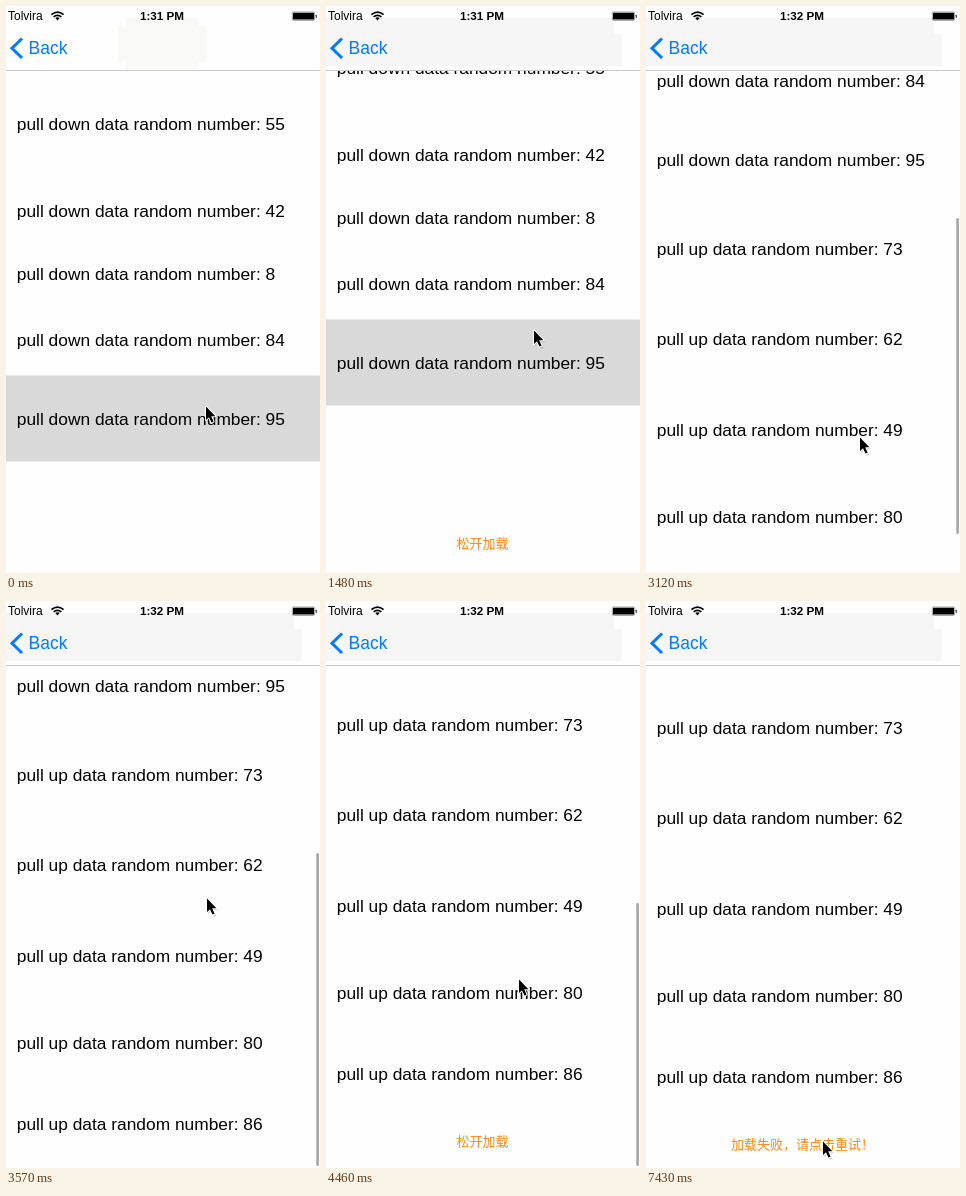
An HTML page for the animation above (8 s loop, 314 by 567 pixels).

```html
<!DOCTYPE html>
<html lang="en">
<head>
<meta charset="utf-8">
<title>Pull to load</title>
<style>
  html, body { margin: 0; width: 100%; height: 100%; overflow: hidden; background: #fefefe; }
  svg { display: block; width: 100%; height: 100%; }
  text { font-family: "Liberation Sans", Arial, sans-serif; white-space: pre; }
  .row { font-size: 17.35px; }
  #clock { font-size: 11.7px; font-weight: bold; text-anchor: middle; }
  #hint {
    font: 13px "Noto Sans CJK SC", "Noto Sans CJK", sans-serif;
    fill: #ff8a14; text-anchor: middle;
  }
</style>
</head>
<body>
<svg viewBox="0 0 314 567">
  <rect width="314" height="567" fill="#fefefe"/>
  <g id="list">
    <rect id="picked" y="369.5" width="314" height="86" fill="#d9d9d9"/>
    <g id="down"></g>
    <g id="up"></g>
    <text id="hint" x="156.5"></text>
  </g>
  <rect id="bar" x="310.3" width="2.6" rx="1.3" fill="#a6a6a6"/>

  <rect width="314" height="64" fill="#fefefe"/>
  <path id="tint"/>
  <rect y="64" width="314" height="1" fill="#c9c9c9"/>
  <text x="2" y="14.3" font-size="12">Tolvira</text>
  <g fill="none" stroke="#000" stroke-width="1.7">
    <path d="M45.4 8.6Q51.5 3.6 57.6 8.6M47.6 10.9Q51.5 7.7 55.4 10.9"/>
    <path d="M49.4 12L51.5 14.4L53.6 12Q51.5 10.6 49.4 12Z" fill="#000" stroke="none"/>
  </g>
  <text id="clock" x="156" y="14"></text>
  <rect x="286.3" y="6" width="22.4" height="8.4" rx="1.4" fill="none" stroke="#666" stroke-width=".6"/>
  <rect x="287" y="6.8" width="21" height="6.8" rx=".6"/>
  <rect x="309.6" y="8.7" width="1.3" height="3.2" rx=".6" fill="#444"/>
  <path d="M16 32.5L6 42.3L16 52" fill="none" stroke="#007aff" stroke-width="3"/>
  <text x="22.6" y="48" font-size="17.5" fill="#007aff">Back</text>

  <g id="cursor" stroke-linejoin="round">
    <path d="M1 2V16L4.3 13L7 19L9.4 18L6.8 12.2H11.2Z" opacity=".18"/>
    <path d="M0 .5V14L3 11.2L5.5 16.6L7.6 15.7L5.2 10.2H9.4Z" stroke="#fff" stroke-width="2" paint-order="stroke"/>
  </g>
</svg>
<script>
const LOOP = 8000, STEP = 148.5, LEAD = 439;
const END = 325;        // scroll offset at the end of the full list
const LOADED = 13, FAILED = 34;
const $ = id => document.getElementById(id);

// Moves: [first tick, last tick, ...goal], each easing out from the goal before.
const drags = [
  [0, 0, 0],
  [0, 2, 103],    // pull past the end
  [4, 10, 50],    // let go, rest above the hint
  [16, 22, 328],  // flick through the new rows
  [22, 25, 399],  // pull again
  [26, 29, 375]
];
const pointer = [
  [0, 0, 200, 400],
  [0, 2, 196, 172], [4, 5, 194, 226], [5, 14, 220, 403],
  [16, 17, 217, 340], [17, 19, 214, 431], [19, 25, 197, 252],
  [26, 34, 188, 539], [39, 41, 196, 543], [46, 48, 177, 540]
];

const clamp = x => Math.min(1, Math.max(0, x));
const easeOut = p => 1 - (1 - p) ** 2;

function follow(moves, k) {
  return moves.slice(1).reduce((pos, [a, b, ...goal]) => {
    const e = easeOut(clamp((k - a) / (b - a)));
    return pos.map((v, i) => v + (goal[i] - v) * e);
  }, moves[0].slice(2)).map(Math.round);
}

function addRows(id, rows) {
  $(id).innerHTML = rows.map(([y, n]) =>
    `<text class="row" x="10.8" y="${y + 0.5}">pull ${id} data random number: ${n}</text>`).join("");
}
addRows("down", [[123, 55], [210, 42], [273, 8], [339, 84], [418, 95]]);
addRows("up", [[507, 73], [597, 62], [688, 49], [775, 80], [856, 86]]);

function setText(id, s) {
  if ($(id).textContent !== s) $(id).textContent = s;
}

function navTint(k) {
  if (k < 5) return "M120 12h72v8h8v36h-8v8h-72v-8h-8v-36h8z";
  if (k >= 12 && k < 17) return "M0 36h264v8h16v8h8v12H0z";
  return "M0 12h288v16h8v32H0z";
}

function draw(t) {
  const k = Math.max(0, Math.floor((t - LEAD) / STEP) + 1);
  const [y] = follow(drags, k), [px, py] = follow(pointer, k);
  const more = k >= LOADED;
  $("list").setAttribute("transform", `translate(0 ${-y})`);
  $("cursor").setAttribute("transform", `translate(${px} ${py})`);
  $("tint").setAttribute("d", navTint(k));
  $("tint").setAttribute("fill", k < 5 ? "#f9f9f8" : "#f6f6f6");
  setText("clock", k < 9 ? "1:31 PM" : "1:32 PM");
  setText("hint", k < FAILED ? "松开加载" : "加载失败，请点击重试！");
  $("hint").setAttribute("y", more ? 922.5 : 597.5);
  $("up").style.display = more ? "" : "none";
  $("picked").style.display = more ? "none" : "";

  // The scroll bar shrinks while the list is pulled past its end.
  const over = Math.max(0, y - END);
  $("bar").setAttribute("y", 67 + 182 * Math.min(y, END) / END + over);
  $("bar").setAttribute("height", 316 - over);
  $("bar").setAttribute("opacity", k < 17 ? 0 : clamp((31 - k) / 3));
}

const start = performance.now();
function tick() {
  draw((performance.now() - start) % LOOP);
  requestAnimationFrame(tick);
}
tick();
</script>
</body>
</html>
```
